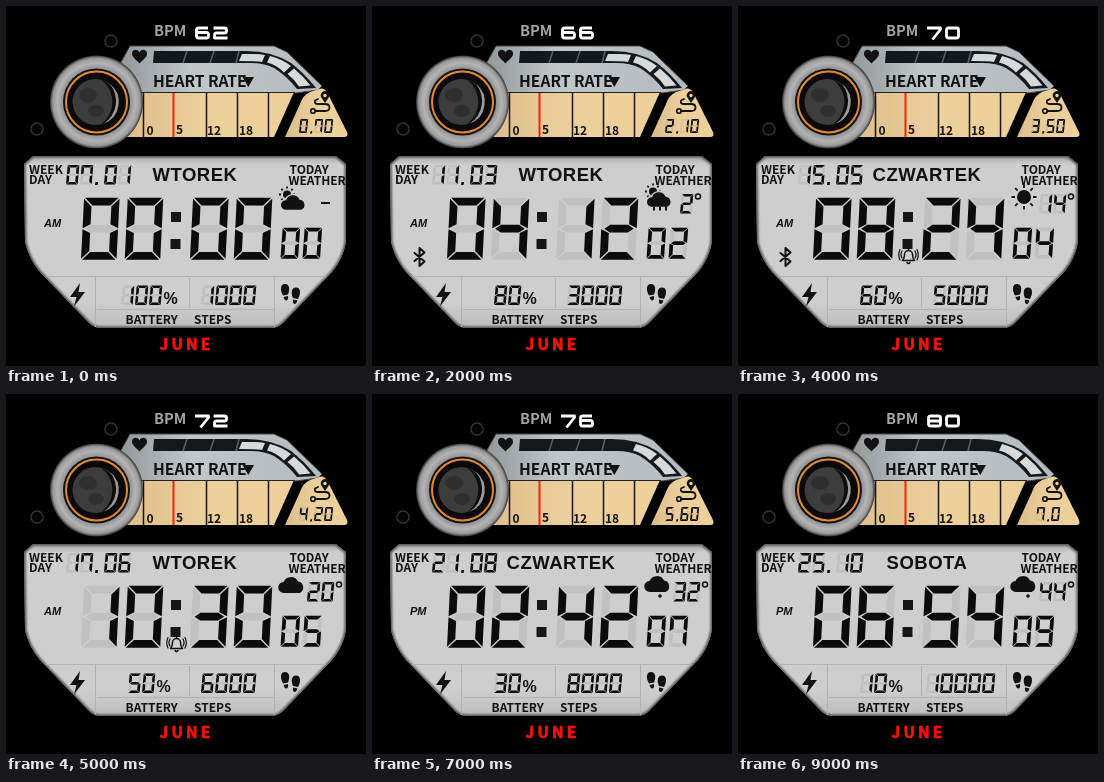
These frames come from a looping animation (360 by 360 pixels, 10 s). An HTML page:

```html
<!DOCTYPE html>
<html lang="en">
<head>
<meta charset="utf-8">
<title>LCD watch face</title>
<style>
  html, body { margin: 0; width: 100%; height: 100%; overflow: hidden; background: #000; }
  svg { display: block; width: 100%; height: 100%; }
  text { font-family: "Noto Sans CJK JP", "Noto Sans CJK SC", "Open Sans", sans-serif; font-weight: 700; }
  .label { font-size: 12px; fill: #111; }
  .arial { font-family: "Liberation Sans", sans-serif; }
  .line { fill: none; stroke: #111; stroke-linecap: round; stroke-linejoin: round; }
</style>
</head>
<body>
<svg viewBox="0 0 360 360">
  <defs>
    <linearGradient id="panel" x1="0" y1="0" x2="0" y2="1">
      <stop offset="0" stop-color="#a8a8a8"/><stop offset=".05" stop-color="#cecece"/>
      <stop offset=".85" stop-color="#cecece"/><stop offset="1" stop-color="#bdbdbd"/>
    </linearGradient>
    <linearGradient id="steel" x1="0" y1="0" x2="1" y2="0">
      <stop offset="0" stop-color="#92979a"/><stop offset=".35" stop-color="#c0c6c9"/>
      <stop offset="1" stop-color="#b4babd"/>
    </linearGradient>
    <radialGradient id="knob">
      <stop offset=".7" stop-color="#8c8c8c"/><stop offset=".84" stop-color="#b4b4b4"/>
      <stop offset=".94" stop-color="#999"/><stop offset="1" stop-color="#333"/>
    </radialGradient>
    <linearGradient id="sand">
      <stop offset="0" stop-color="#dcbc8a"/><stop offset=".5" stop-color="#ecd09c"/>
      <stop offset="1" stop-color="#edcf9a"/>
    </linearGradient>
    <filter id="soft"><feGaussianBlur stdDeviation="1.3"/></filter>
    <path id="cloud" d="M278 198a5.500 5.500 0 0 1-.5-11A8 8 0 0 1 292 186.500a6 6 0 0 1 1.500 11.500z"/>
    <path id="case" d="M27 150H330L340 158V236Q337 253 326 266L277 317Q272 322 265 322H95Q88 322 83 317L34 266Q23 253 19 236L18 158z"/>
    <clipPath id="inside"><use href="#case"/></clipPath>
  </defs>

  <!-- Heart rate gauge -->
  <path d="M124 40H268L281 46L316 80L312 84L290 87H120L114 58z" fill="url(#steel)" stroke="#444"/>
  <path d="M148 45H240Q266 45 285 57Q298 67 310 82L291 83Q281 70 268 62Q258 57 245 57H147z" fill="#15181a"/>
  <path d="M181 45l-4 12M208 45l-4 12M233 45l-3 12" stroke="#596066" stroke-width="1.500"/>
  <g fill="#d7dadd">
    <path id="zone" d="M236 48H248Q254 48 259 49L256 56Q250 55 233 55z"/>
    <path d="M264 50Q276 53 285 60L278 66.500Q271 59 261 56.500z"/>
    <path d="M288 62.500Q297 70 304.500 79.500L293 80.500Q288 73 281.500 68z"/>
  </g>
  <path d="M133.500 57.500C130 53.500 126 51.500 126 47.500C126 43 132 42.500 133.500 46.500C135 42.500 141 43 141 47.500C141 51.500 137 53.500 133.500 57.500z" fill="#111"/>
  <path d="M120 86H288L268 131H110z" fill="url(#sand)"/>
  <path d="M137.500 87v44M200.500 87v44M231.500 87v44M262.500 87v44" stroke="#17130c" stroke-width="1.500"/>
  <path d="M128 86.500H289" stroke="#222"/>
  <path d="M167.500 87v44" stroke="#ee2510" stroke-width="2"/>
  <path d="M279 131L294 98Q297 89 304 86L315 82.500Q319 82 322 88L341 126Q343 131 338 131z" fill="url(#sand)"/>
  <g font-size="12" fill="#17130c">
    <text x="140.500" y="129">0</text><text x="170" y="128">5</text>
    <text x="201" y="129">12</text><text x="233" y="129">18</text>
  </g>
  <text x="147" y="80.500" font-size="15.600" fill="#111">HEART RATE</text>
  <path d="M236.500 71h11.500l-5.700 10z" fill="#111"/>
  <text x="148" y="29.700" font-size="14.700" fill="#a5a5a5">BPM</text>
  <path class="line" d="M309 105H319Q323.500 105 323.500 101.500T319 98H312Q308 98 309 94.500L312 93" stroke-width="1.800"/>
  <circle class="line" cx="307" cy="105" r="2.300" stroke-width="1.600"/>
  <path d="M319 97l-4-6a4.300 4.300 0 1 1 8 0z" fill="#111"/>
  <circle cx="319" cy="89.500" r="1.700" fill="#edd09a"/>

  <!-- Knob and moon -->
  <g fill="#050505" stroke="#333" stroke-width="1.500">
    <circle cx="105" cy="35" r="6"/><circle cx="31" cy="123" r="6"/>
  </g>
  <circle cx="90.500" cy="96" r="46.500" fill="url(#knob)"/>
  <circle cx="90.500" cy="96" r="33.500" fill="#111"/>
  <circle cx="90.500" cy="96" r="30.500" fill="#090909" stroke="#e08a38" stroke-width="2"/>
  <circle cx="89.500" cy="96" r="23" fill="#3c3c3c"/>
  <path d="M95 74A23 23 0 0 1 95 118A27 27 0 0 0 95 74z" fill="#0c0c0c"/>
  <path d="M104 78A23 23 0 0 1 98 117.500A27 27 0 0 0 104 78z" fill="#9a9a9a"/>
  <g fill="#262626" opacity=".6">
    <ellipse cx="82" cy="89" rx="9" ry="7"/><ellipse cx="90" cy="105" rx="8" ry="6"/>
  </g>

  <!-- LCD panel -->
  <use href="#case" fill="url(#panel)"/>
  <g clip-path="url(#inside)">
    <use href="#case" fill="none" stroke="#4c4c4c" stroke-width="3" filter="url(#soft)"/>
  </g>
  <path d="M40 270.500H320M89.500 271V321M268.500 271V321M183.500 272V302M91 303.500H268" fill="none" stroke="#b2b2b2"/>
  <g class="label">
    <text x="23" y="167.500">WEEK</text><text x="23" y="178">DAY</text>
    <text x="283.500" y="167.500">TODAY</text><text x="282.500" y="178.500">WEATHER</text>
    <text x="119.500" y="318">BATTERY</text><text x="188" y="318">STEPS</text>
  </g>
  <text x="153.500" y="344" font-size="15.500" letter-spacing="3.100" fill="#ff1008" stroke="#ff1008" stroke-width=".7">JUNE</text>
  <path d="M74 277L64 291H70.500L68 300.500L79 286H72.500z" fill="#111"/>
  <g fill="#111">
    <path d="M279 278c5 0 5 6 3 10.500l-5 1c-3-5-3-11.500 2-11.500zM277.500 291l4.500-1c1 5-3 6.500-4.500 1z"/>
    <path d="M290 281.500c-5 0-5 6-3 10.500l5 1c3-5 3-11.500-2-11.500zM291.500 294.500l-4.500-1c-1 5 3 6.500 4.500 1z"/>
  </g>

  <!-- Readouts -->
  <path id="ghost" fill="#000" fill-opacity=".07"/>
  <path id="digits" fill="#0b0b0b"/>
  <path d="M165 206h10v10h-10zM164.500 233h10v10h-10z" fill="#161616"/>
  <g id="bpm" fill="none" stroke="#fff" stroke-width="2.800" stroke-linejoin="round"></g>
  <text id="weekday" class="arial" x="189" y="174.500" font-size="18.500" letter-spacing=".5" text-anchor="middle"></text>
  <text id="half" class="arial" x="38" y="221" font-size="11" font-style="italic" fill="#111"></text>
  <text id="percent" class="arial" y="297.500" font-size="16" fill="#111">%</text>
  <circle id="degree" class="line" cy="190.500" r="2.500" stroke-width="1.500"/>
  <path id="minus" d="M315 197h9" stroke="#111" stroke-width="2"/>
  <path id="bluetooth" class="line" d="M42.500 247l10 8.500-5 4.500V242l5 4.500-10 8.500" stroke-width="2"/>
  <g id="alarm" class="line" stroke-width="1.500">
    <path d="M164.500 254.500q2-2 2-6a4 4 0 0 1 8 0q0 4 2 6zM169 256.500q1.500 2 3 0M170.500 244v-1"/>
    <path d="M164 245q-2 4 0 7M177 245q2 4 0 7M162 243.500q-2.500 5.500 0 10.500M179 243.500q2.500 5.500 0 10.500" stroke-width="1.200"/>
  </g>
  <g id="weather" fill="#111" stroke="#111" stroke-width="0"></g>
</svg>

<script>
const byId = id => document.getElementById(id);
const show = (id, on) => byId(id).setAttribute("visibility", on ? "visible" : "hidden");

// Lit segments per digit: a-f clockwise from the top, g in the middle
const SEGMENTS = ["abcdef", "bc", "abged", "abgcd", "fgbc", "afgcd", "afgedc", "abcf", "abcdefg", "abcdfg"];

function sevenSegment(digit, x, y, { w, h, t, slant, gap }) {
  const m = h / 2;
  const top = [[gap, 0], [w - gap, 0], [w - t - gap, t], [t + gap, t]];
  const side = [[0, gap], [t, t + gap], [t, m - t / 2 - gap / 2], [0, m - gap / 2]];
  const flipX = points => points.map(([px, py]) => [w - px, py]);
  const flipY = points => points.map(([px, py]) => [px, h - py]);
  const shapes = {
    a: top, b: flipX(side), c: flipY(flipX(side)), d: flipY(top), e: flipY(side), f: side,
    g: [[gap + t / 4, m], [t + gap, m - t / 2], [w - t - gap, m - t / 2],
        [w - gap - t / 4, m], [w - t - gap, m + t / 2], [t + gap, m + t / 2]]
  };
  return [...SEGMENTS[digit]].map(key => "M" + shapes[key].map(([px, py]) =>
    (x + px + (h - py) * slant).toFixed(2) + " " + (y + py).toFixed(2)).join("L") + "z").join("");
}

const BIG = { w: 35.5, h: 62, t: 7.8, slant: .05, gap: 1, cell: 43.7 };
const MEDIUM = { w: 17.5, h: 31, t: 3.7, slant: .07, gap: .5, cell: 22 };
const SMALL = { w: 11.6, h: 19.5, t: 2.6, slant: .09, gap: .3, cell: 14, dot: 10 };
const TINY = { w: 7.8, h: 14, t: 1.8, slant: .1, gap: .2, cell: 10, dot: 5 };

const textWidth = (text, font) =>
  [...text].reduce((sum, ch) => sum + (ch === "." ? font.dot : font.cell), 0);

function lcd([text, x, y, font]) {
  let path = "";
  for (const ch of text) {
    if (ch === ".") path += `M${x + 1.5} ${y + font.h - font.t}h${font.t}l-.5 ${font.t + .5}h${-font.t}z`;
    else path += sevenSegment(+ch, x, y, font);
    x += textWidth(ch, font);
  }
  return path;
}

const centred = (text, cx, y, font, extra = 0) =>
  [text, cx - (textWidth(text, font) + extra) / 2, y, font];
const unlit = ([text, ...place]) => lcd([text.replace(/\d/g, "8").replace(".", "."), ...place]);

// Wide numerals of the pulse readout
const BOX = "M4 1.5H12Q14 1.5 14 3.5V9.5Q14 11.5 12 11.5H4Q2 11.5 2 9.5V3.5Q2 1.5 4 1.5z";
const WIDE = {
  0: BOX,
  2: "M1 1.5H12Q14 1.5 14 3.5V4.5Q14 6.5 12 6.5H4Q2 6.5 2 8.5V11.5H15",
  4: "M11 13V1.5L1.5 9H15.5",
  6: "M13.5 1.5H4Q2 1.5 2 3.5V9.5Q2 11.5 4 11.5H12Q14 11.5 14 9.5V8Q14 6 12 6H2",
  7: "M.5 1.5H14V3L6 13",
  8: BOX + "M2 6.5H14"
};

function sun(cx, cy, r, reach) {
  let rays = "";
  for (let k = 0; k < 8; k++) {
    const c = Math.cos(k * Math.PI / 4), s = Math.sin(k * Math.PI / 4);
    rays += `M${cx + c * (r + 2)} ${cy + s * (r + 2)}L${cx + c * reach} ${cy + s * reach}`;
  }
  return `<circle cx="${cx}" cy="${cy}" r="${r}"/><path d="${rays}" stroke-width="1.8"/>`;
}
const cloud = dy => `<use href="#cloud" y="${dy}"/>`;
const sunnyCloud = dy => sun(281, 187 + dy, 4, 8) +
  `<use href="#cloud" x="2" y="${5 + dy}" stroke="#cecece" stroke-width="1.5"/>`;
const rain = (...xs) => xs.map(x => `<path d="M${x} 200.500v4" stroke-width="2"/>`).join("");
const snow = (...xs) => xs.map(x => `<circle cx="${x}" cy="202" r="1.800"/>`).join("");

const SKIES = [
  sunnyCloud(1.5),
  sunnyCloud(1.5),
  sunnyCloud(-1.5) + rain(282, 288, 294),
  sunnyCloud(-1.5) + snow(283, 291),
  sun(286, 191, 7, 12.5),
  cloud(1),
  cloud(0) + rain(284, 291),
  cloud(0) + snow(288),
  cloud(0) + rain(279, 284, 289, 294),
  cloud(0) + snow(290)
];
const DAYS = ["NIEDZIELA", "PONIEDZIAŁEK", "WTOREK", "ŚRODA", "CZWARTEK", "PIĄTEK", "SOBOTA"];
const pad = n => String(n).padStart(2, "0");

function render(step) {
  const day = 7 + 2 * step, hour = 2 * step;
  const weekday = new Date(2025, step, day).getDay();
  const battery = String(100 - 10 * step);
  const distance = (.7 * (step + 1)).toFixed(step === 9 ? 1 : 2);
  const warm = step >= 2, temperature = String(6 * step - 10);

  const readouts = [
    [pad(hour % 12), 75, 191.7, BIG],
    [pad(6 * step), 184, 191.7, BIG],
    [pad(day) + "." + pad(step + 1), 60, 159, SMALL],
    [pad(step), 274.5, 221.7, MEDIUM],
    centred(distance, 310.5, 113, TINY),
    centred(battery, 143.5, 279.5, SMALL, 15),
    centred(String(1000 * (step + 1)), 223, 279.5, SMALL)
  ];
  if (warm) readouts.push(centred(temperature, 319, 188, SMALL, 8));
  byId("digits").setAttribute("d", readouts.map(lcd).join(""));
  byId("ghost").setAttribute("d", readouts.map(unlit).join(""));

  byId("bpm").innerHTML = [...String(62 + 2 * step)].map((ch, i) =>
    `<path transform="translate(${188.5 + 18 * i} 20.500)" d="${WIDE[ch]}"/>`).join("");
  byId("weekday").textContent = DAYS[weekday];
  byId("weekday").setAttribute("fill", weekday ? "#111" : "#ff1010");
  byId("half").textContent = hour < 12 ? "AM" : "PM";
  byId("percent").setAttribute("x", 143.5 + (battery.length * 14 - 15) / 2 + .5);
  byId("degree").setAttribute("cx", 319 + temperature.length * 7);
  byId("weather").innerHTML = SKIES[step];

  show("degree", warm);
  show("minus", !warm);
  show("bluetooth", step >= 1 && step <= 4);
  show("alarm", step >= 3 && step <= 6);
  show("zone", step < 7);
}

const start = performance.now();
let shown = -1;
function tick() {
  const step = Math.floor((performance.now() - start) / 1000) % 10;
  if (step !== shown) render(shown = step);
  requestAnimationFrame(tick);
}
tick();
</script>
</body>
</html>
```
